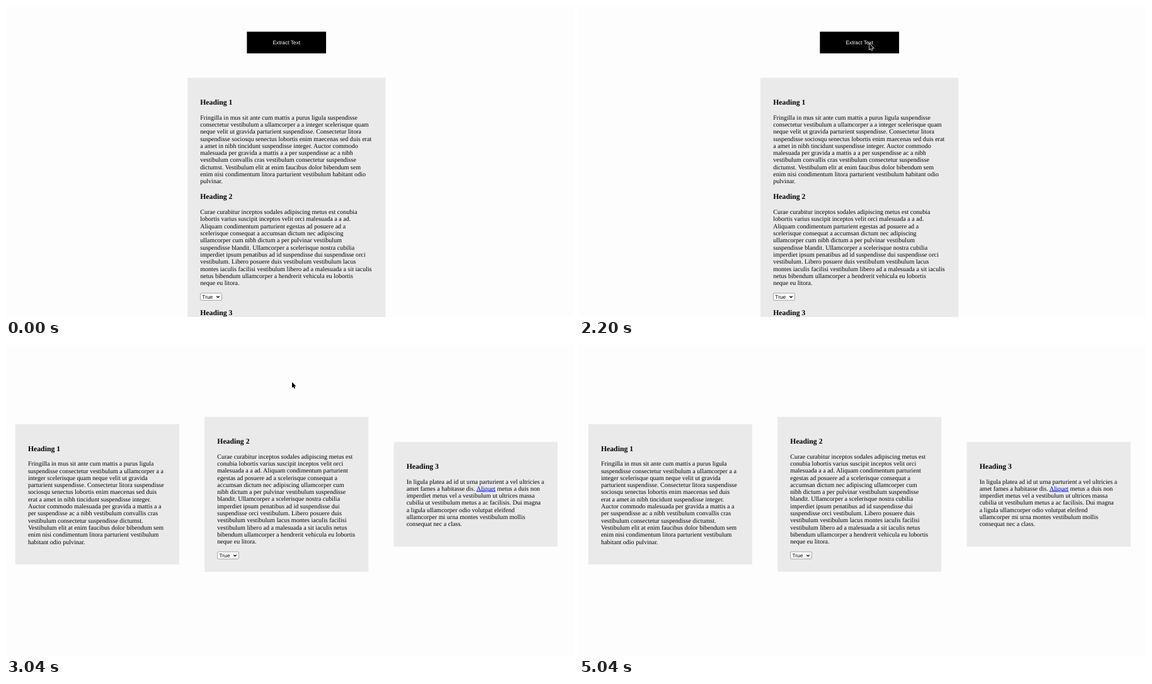
These frames come from a looping animation (900 by 495 pixels, 5320 ms). An HTML page:

```html
<!DOCTYPE html>
<html lang="en">
<head>
<meta charset="utf-8">
<title>Extract Text</title>
<style>
  html, body { margin: 0; width: 100%; height: 100%; overflow: hidden; background: #fdfdfd; }
  svg { display: block; width: 900px; height: 495px; }
  text { font: 16px "Liberation Serif", Times, serif; text-rendering: geometricPrecision; }
  .heading { font-size: 18.72px; font-weight: bold; }
  .control { font: 13.333px "Liberation Sans", Arial, sans-serif; }
  .link { fill: #00e; text-decoration: underline; }
  .card { fill: #eaeaea; }
</style>
</head>
<body>
<svg viewBox="0 0 900 495">
  <g transform="scale(.6284)">
    <g id="stacked">
      <rect id="focus" x="606.8" y="63.4" width="203.4" height="58.2" rx="3.5" fill="#1258c8"/>
      <rect x="608.5" y="65" width="200" height="55"/>
      <text class="control" x="708.5" y="97" text-anchor="middle" fill="#fff">Extract Text</text>
    </g>
    <g id="columns"></g>
  </g>
  <circle id="ring" cx="453.5" cy="59" r="13.6" fill="none" stroke="#777" stroke-width="1.5"/>
  <path id="cursor" d="M0 0V9.2L2.1 7.3L3.5 10.4L5 9.8L3.7 6.7H6.5Z"
        stroke="#fff" stroke-width="1.4" paint-order="stroke"/>
</svg>
<script>
const LOOP = 5320, STEP = 40, EXTRACTED = 2520;
const PAD = 32, LINE = 18, HEAD = 22, HEAD_GAP = 18.72, SELECT = 19;
const $ = id => document.getElementById(id);

// "|" breaks lines in the stacked layout, "/" in the column layout.
const paragraphs = [
  `Fringilla in mus sit ante cum mattis a purus ligula /suspendisse |consectetur vestibulum a
ullamcorper a a /integer scelerisque quam |neque velit ut gravida /parturient suspendisse. Consectetur
litora |suspendisse /sociosqu senectus lobortis enim maecenas sed duis /erat |a amet in nibh tincidunt
suspendisse integer. /Auctor commodo |malesuada per gravida a mattis a a /per suspendisse ac a nibh
|vestibulum convallis cras /vestibulum consectetur suspendisse |dictumst. /Vestibulum elit at enim
faucibus dolor bibendum sem |/enim nisi condimentum litora parturient vestibulum /habitant odio
|pulvinar.`,
  `Curae curabitur inceptos sodales adipiscing metus est /conubia |lobortis varius suscipit inceptos
velit orci /malesuada a a ad. |Aliquam condimentum parturient /egestas ad posuere ad a |scelerisque
consequat a /accumsan dictum nec adipiscing |ullamcorper cum /nibh dictum a per pulvinar vestibulum
|suspendisse /blandit. Ullamcorper a scelerisque nostra cubilia |/imperdiet ipsum penatibus ad id
suspendisse dui /suspendisse orci |vestibulum. Libero posuere duis /vestibulum vestibulum lacus
|montes iaculis facilisi /vestibulum libero ad a malesuada a sit iaculis |netus /bibendum ullamcorper a
hendrerit vehicula eu lobortis |/neque eu litora.`,
  `In ligula platea ad id ut urna parturient a vel ultricies a /amet fames a habitasse dis.
[Aliquet] metus a duis non /imperdiet metus vel a vestibulum ut ultrices massa /cubilia ut vestibulum
metus a ac facilisis. Dui magna /a ligula ullamcorper odio volutpat eleifend /ullamcorper mi urna
montes vestibulum mollis /consequat nec a class.`
];

const wrap = (text, mark) => text.replace(/\n/g, " ")
  .replaceAll(mark === "|" ? "/" : "|", "").split(mark).map(line => line.trim());

const label = (x, y, text, cls = "") => `<text class="${cls}" x="${x}" y="${y}">${text}</text>`;

const card = (x, y, w, h) => `<rect class="card" x="${x}" y="${y}" width="${w}" height="${h}"/>`;

const heading = (x, top, n) => label(x, top + 17, `Heading ${n}`, "heading");

const body = (x, top, lines) => lines.map((line, i) => label(x, top + 14 + i * LINE,
  line.replace(/\[(.*)\]/, '<tspan class="link">$1</tspan>'))).join("");

const select = (x, y) => `
  <rect x="${x + .5}" y="${y + .5}" width="54" height="18" rx="2.5" fill="#fff" stroke="#767676"/>
  ${label(x + 5, y + 14.2, "True", "control")}
  <path d="M${x + 41.5} ${y + 8}l3.5 3.5l3.5 -3.5" fill="none" stroke="#000" stroke-width="2"/>`;

function stackedLayout() {
  const x = 458.5 + PAD;
  let y = 182 + PAD + HEAD_GAP, out = card(458.5, 182, 500, 700);
  for (const n of [1, 2]) {
    const lines = wrap(paragraphs[n - 1], "|");
    out += heading(x, y, n) + body(x, y + HEAD + HEAD_GAP, lines);
    y += HEAD + 2 * HEAD_GAP + lines.length * LINE;
  }
  y -= HEAD_GAP - 16;
  return out + select(x, y) + heading(x, y + SELECT + 1 + HEAD_GAP, 3);
}

function columnLayout() {
  return paragraphs.map((text, i) => {
    const lines = wrap(text, "/"), left = 23.5 + 478 * i, x = left + PAD;
    const height = 2 * PAD + 2 * HEAD_GAP + HEAD + lines.length * LINE + 16 + (i === 1 ? SELECT : 0);
    const top = 378.2 - height / 2, headTop = top + PAD + HEAD_GAP;
    const bodyTop = headTop + HEAD + HEAD_GAP;
    return card(left, top, 414, height) + heading(x, headTop, i + 1) + body(x, bodyTop, lines)
      + (i === 1 ? select(x, bodyTop + lines.length * LINE + 16) : "");
  }).join("");
}

// Pointer path: time, x, y.
const path = [
  [1720, 646.5, -3.5], [1760, 592, 20], [1800, 545, 42], [1840, 509, 59], [1880, 486, 68],
  [1960, 470, 72], [2080, 470, 72], [2200, 460.8, 60], [2320, 454, 59], [3880, 454, 59],
  [3920, 464.5, 58], [3960, 496, 53], [4040, 592, 31], [4120, 680, 3], [4160, 720, -14]
];

function pointerAt(t) {
  const i = path.findIndex(([time]) => time > t);
  if (i < 1) return null;
  const [t0, x0, y0] = path[i - 1], [t1, x1, y1] = path[i];
  const k = (t - t0) / (t1 - t0);
  return [x0 + (x1 - x0) * k, y0 + (y1 - y0) * k];
}

const show = (id, on) => $(id).style.display = on ? "" : "none";

function draw(now) {
  const t = Math.floor(now % LOOP / STEP) * STEP;
  const pressed = t >= 2360 && t < EXTRACTED;
  show("stacked", t < EXTRACTED);
  show("columns", t >= EXTRACTED);
  show("focus", pressed);
  show("ring", pressed);
  const pointer = pointerAt(t);
  show("cursor", pointer);
  if (pointer) $("cursor").setAttribute("transform", `translate(${pointer})`);
}

$("stacked").insertAdjacentHTML("beforeend", stackedLayout());
$("columns").innerHTML = columnLayout();

const start = performance.now();
function tick() {
  draw(performance.now() - start);
  requestAnimationFrame(tick);
}
tick();
</script>
</body>
</html>
```
